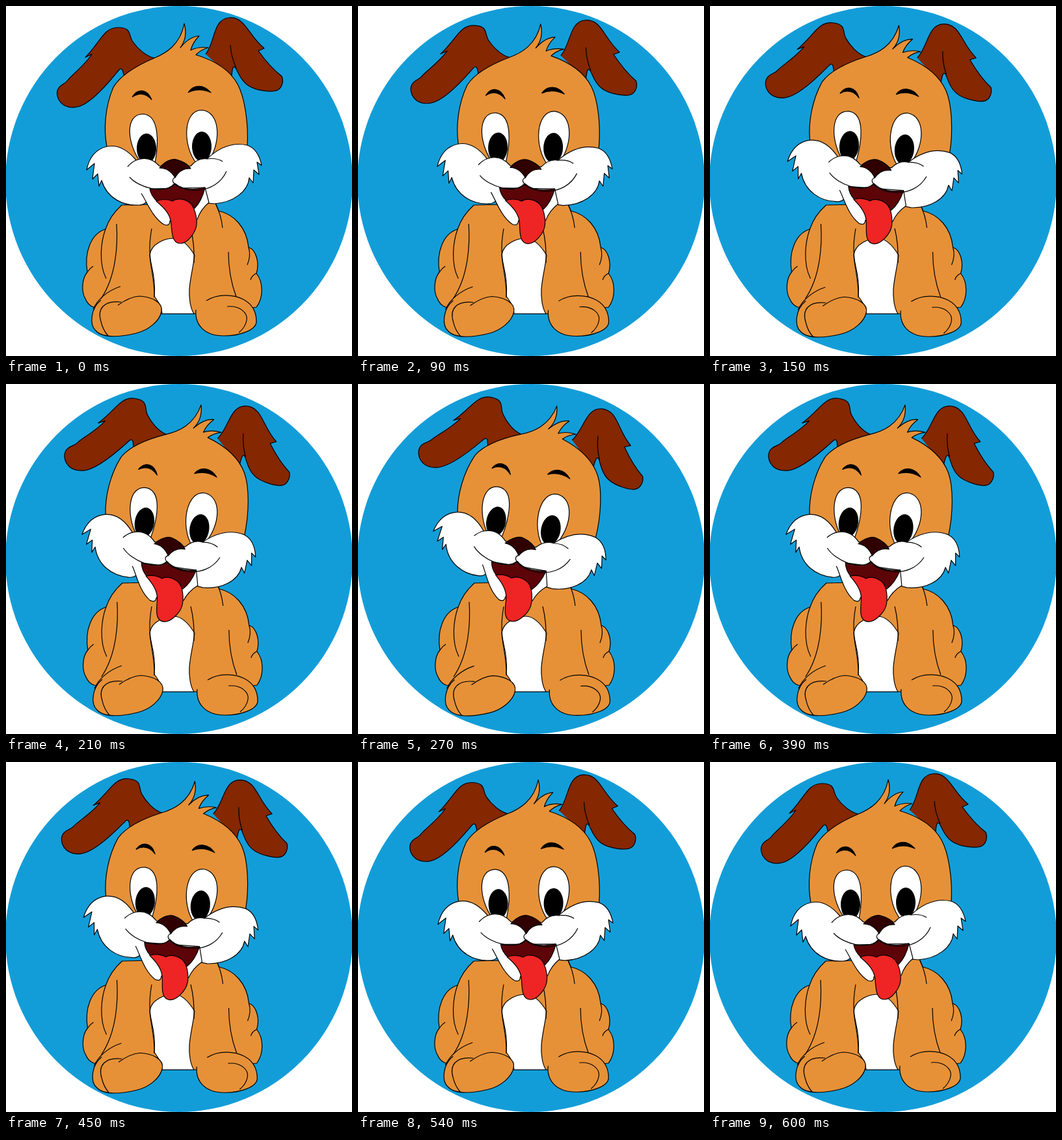
Recreate the animation shown at these times as an HTML page with a canvas. Size 532 by 538 pixels, loop 0.63 s.

```html
<!DOCTYPE html>
<html>
<head>
<meta charset="utf-8">
<style>
html, body { margin: 0; overflow: hidden; background: #fff }
canvas { display: block }
</style>
</head>
<body>
<canvas width="532" height="538"></canvas>
<script>
const ctx = document.querySelector('canvas').getContext('2d');
const ORANGE = '#e69138', BROWN = '#852700', WHITE = '#fff', BLACK = '#000';

function line(d) {
  ctx.stroke(new Path2D(d));
}

function shape(fill, d) {
  ctx.fillStyle = fill;
  ctx.fill(new Path2D(d));
  line(d);
}

function group(draw, dx, dy) {
  ctx.save();
  ctx.translate(dx, dy);
  draw();
  ctx.restore();
}

function drawBody() {
  shape(ORANGE, 'M178 306Q160 322 153 343C130 350 120 380 125 409C116 420 116 440 122 450Q126 460 135 463L236 473H295L385 463C396 448 396 425 385 411C390 395 385 375 373 371C370 340 350 320 327 315L322 303Z');
  line('M322 303Q331 322 333 341');
  line('M153 343C146 362 142 395 154 419');
  line('M125 409Q129 403 134 400');
  line('M170 335C172 365 170 415 146 450');
  line('M342 378Q342 415 354 447');
  line('M373 371Q377 384 371 398');
  line('M385 411Q378 414 376 421');
}

function drawChest() {
  shape(WHITE, 'M221 383C223 365 245 357 258 357S282 370 290 383C288 400 283 420 282 435S284 466 289 473H240Q240 462 228 446C229 425 222 400 221 383Z');
  line('M224 342Q218 375 224 400T228 448');
  line('M284 342Q290 365 289 395');
}

function drawFeet() {
  shape(ORANGE, 'M146 452C130 465 128 490 138 499C150 512 180 508 200 503S236 484 239 470 225 447 205 446Q190 447 172 460');
  line('M177 455C150 452 140 466 146 485Q149 498 157 507');
  line('M176 431C155 438 140 452 134 466');
  shape(ORANGE, 'M308 453C325 442 350 443 365 451S385 472 385 485 360 507 335 507C305 507 290 490 292 467');
  line('M340 462C360 460 372 472 370 483Q368 494 358 502');
}

function drawEars() {
  shape(BROWN, 'M182 112C180 98 178 94 174 98S135 150 110 155 76 140 79 130 90 121 95 114 122 90 132 74L122 79C145 56 150 33 172 33S188 45 195 55 215 77 228 80');
  shape(BROWN, 'M307 74C322 55 318 20 343 18S372 45 397 65L388 69Q406 94 424 108C427 115 425 125 418 129S385 131 372 122 356 98 352 94 347 105 347 110');
  line('M345 60Q346 78 354 95');
}

function drawSkull() {
  shape(ORANGE, 'M155 216C150 190 152 155 165 125C175 108 200 92 228 80C245 73 268 60 274 27Q280 48 268 64Q282 47 297 46Q287 56 284 68Q296 62 311 64Q300 67 292 75C325 85 345 100 356 120S373 180 371 215L340 250H180Z');
}

function drawEyes() {
  shape(WHITE, 'M207 240C186 212 182 166 211 166C236 168 235 210 229 242');
  shape(WHITE, 'M293 242C271 215 272 160 301 160C328 162 332 205 313 236');
  for (const [x, y] of [[216, 219], [301, 216]]) {
    ctx.fillStyle = BLACK;
    ctx.beginPath();
    ctx.ellipse(x, y, 15, 23, 0, 0, 7);
    ctx.fill();
  }
  shape(BLACK, 'M194 140C202 126 217 127 224 144Q210 129 194 140');
  shape(BLACK, 'M280 133C288 120 304 120 315 133Q297 125 280 133');
}

function drawMuzzle() {
  shape(WHITE, 'M155 216C175 212 190 225 200 237Q220 229 236 246H284Q295 233 309 235C325 220 345 208 371 214Q388 220 393 245L386 240L389 259L381 252L380 272L374 264C372 285 350 302 320 304L300 302L222 290C218 302 212 306 205 306C180 308 155 295 147 268L143 277L141 258L133 266L136 242L124 252Q130 222 155 216Z');
  shape(WHITE, 'M208 288C216 300 225 325 243 336Q252 339 252 330L294 328Q299 313 312 302L306 279L221 281');
  line('M187 247Q193 240 200 237');
  line('M309 235Q324 233 333 239');
}

function drawMouth() {
  shape('#5c0408', 'M221 281Q253 284 260 273Q275 286 306 279Q301 300 290 311L232 300Q223 292 221 281Z');
  line('M190 263C205 280 245 290 259 273C270 287 322 292 339 254');
  line('M260 263Q253 268 259 273');
  shape('#ee2524', 'M231 300Q244 295 256 300C262 295 274 296 282 302S294 325 293 336 280 365 268 365 255 350 254 335 243 310 231 300Z');
  shape('#300000', 'M236 249C243 240 254 234 262 236S280 243 284 250Q268 249 260 264Q251 249 236 249Z');
}

function drawHead(angle) {
  ctx.save();
  ctx.translate(254, 196);
  ctx.rotate(angle);
  ctx.translate(-254, -196);
  drawEars();
  drawSkull();
  drawEyes();
  drawMuzzle();
  drawMouth();
  ctx.restore();
}

function frame(now) {
  const step = Math.floor(now % 630 / 30);
  const sway = (1 - Math.cos(Math.PI * step / 10)) / 2;
  ctx.clearRect(0, 0, 532, 538);
  ctx.fillStyle = '#139dd8';
  ctx.beginPath();
  ctx.ellipse(266, 269, 267, 269, 0, 0, 7);
  ctx.fill();
  ctx.strokeStyle = BLACK;
  ctx.lineWidth = 1.2;
  ctx.lineJoin = 'round';
  group(drawBody, sway, 0);
  group(drawChest, 0, 0);
  group(drawFeet, 2.5 * sway, 2.5 * sway);
  drawHead(0.196 * sway);
  requestAnimationFrame(frame);
}
requestAnimationFrame(frame);
</script>
</body>
</html>
```
